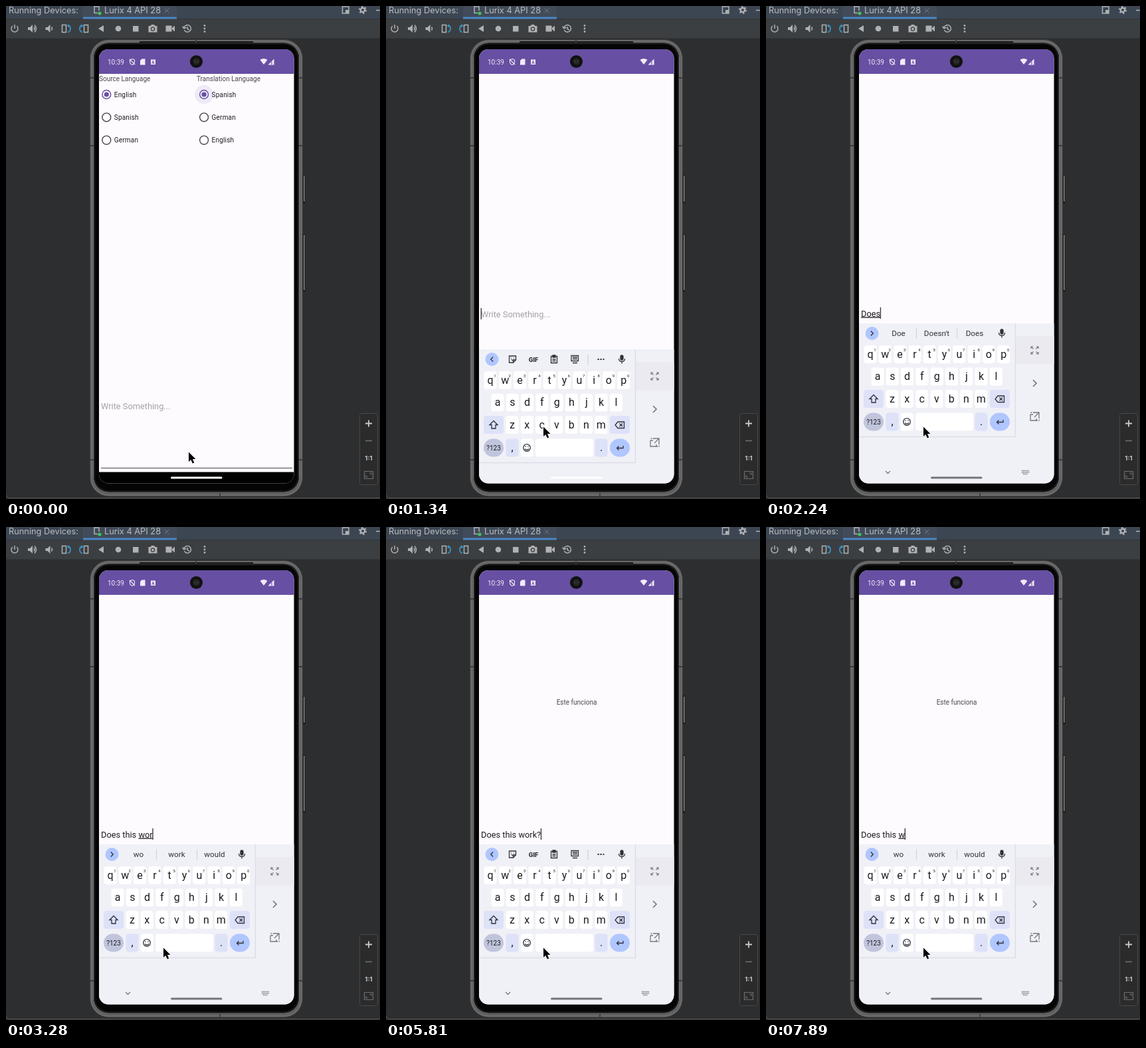
An HTML page that plays this animation: 563x741 px, repeating every 8 s.

```html
<!DOCTYPE html>
<html lang="en">
<head>
<meta charset="utf-8">
<title>Phone translator</title>
<style>
  html, body { margin: 0; width: 100%; height: 100%; overflow: hidden; background: #2d2e30; }
  svg { display: block; width: 100%; height: 100%; }
  text { font-family: Roboto, sans-serif; font-size: 10px; fill: #1d1b20; white-space: pre; }
  .ide text { font: 12.8px Inter, sans-serif; fill: #bbbdbf; }
  .mid, .key { text-anchor: middle; }
  .key { font-size: 16px; }
  .line { fill: none; stroke: #afb1b3; stroke-width: 1.5; }
  .solid { fill: #afb1b3; }
  .dark { fill: none; stroke: #30313a; stroke-width: 1.3; }
  .label, #result { fill: #49454f; }
  #radios text { letter-spacing: .18px; }
  .input, .input text { font-size: 12.8px; }
  #hint { fill: #a4a1a7; }
  .word { font-size: 11.7px; text-anchor: middle; fill: #30313a; }
  #composing { text-decoration: underline; text-decoration-thickness: 1px; }
  #pointer { stroke: #fff; stroke-width: 2; stroke-linejoin: round; paint-order: stroke; }
</style>
</head>
<body>
<svg viewBox="0 0 563 741">
  <defs>
    <clipPath id="screen"><rect x="140" y="65" width="293.5" height="652.5" rx="14"/></clipPath>
  </defs>
  <rect width="563" height="741" fill="#2d2e30"/>

  <g class="ide">
    <rect width="563" height="20" fill="#3c4653"/>
    <rect x="116" width="141" height="19" fill="#414b59"/>
    <rect y="20" width="563" height="28.5" fill="#3c3f41"/>
    <path d="M0 19.5H563" stroke="#323435"/>
    <rect x="116" y="16.5" width="141" height="3" fill="#4a88c7"/>
    <text x="4" y="11">Running Devices:</text>
    <text x="148" y="11">Lurix 4 API 28</text>
    <path class="line" d="M133 0V10.5H138M133 1H140V7"/>
    <circle cx="141" cy="11" r="2.6" fill="#3fc45a"/>
    <path d="M238.5 3.5l7 7m0-7l-7 7" stroke="#6f7780"/>
    <path class="line" d="M506.500 1H516V11H506.500Z"/><path class="solid" d="M511 6h5v5h-5z"/>
    <circle class="line" cx="537" cy="6" r="3.2" style="stroke-width:2.4"/>
    <circle class="line" cx="537" cy="6" r="5" stroke-dasharray="2.2 3.036" style="stroke-width:2.2"/>
    <path class="line" d="M557 6.500h6"/>

    <path class="line" d="M9.700 30.200a5 5 0 1 0 6.600 0M13 28v6"/>
    <g id="speaker">
      <path class="solid" d="M33 32h3l4-4v12l-4-4h-3z"/>
      <path class="line" d="M42 31.500q2 2.500 0 5"/>
    </g>
    <use href="#speaker" x="26.500"/>
    <path class="line" d="M43 28.500q5 5.500 0 11"/>
    <g id="rotate">
      <path class="line" d="M84.500 28.500h6v11h-6z"/>
      <path d="M93 29.500q4 0 4 4.500t-4 5.500m2-11.500l-2 1.500 2 2" fill="none" stroke="#3592c4" stroke-width="1.800"/>
    </g>
    <use href="#rotate" transform="translate(208)scale(-1 1)"/>
    <path class="solid" d="M139 34l8-5v10zM191 30h8.500v8.500H191zM240.500 29.500h9v9h-9zM250 33l4-3.500v9L250 35z"/>
    <circle class="solid" cx="169" cy="34" r="4.300"/>
    <path class="solid" d="M214.500 30h3l1.500-2h4l1.500 2h3v9.500h-13z"/>
    <circle cx="221" cy="34.500" r="2.600" fill="#afb1b3" stroke="#3c3f41" stroke-width="1.300"/>
    <path class="line" d="M268.400 36.200a5.300 5.300 0 1 0-.5-3.200M265.800 30.500l2 3.300 3.700-1.500M273.200 31v3.500l2.500 1.500"/>
    <g class="solid"><circle cx="299" cy="29.500" r="1.400"/><circle cx="299" cy="34" r="1.400"/><circle cx="299" cy="38.500" r="1.400"/></g>

    <rect x="532.500" y="612.500" width="27" height="107" rx="3" fill="#2b2b2c" stroke="#47494b"/>
    <path d="M541 627.500h10m-5-5v10" stroke="#c8cacc" stroke-width="1.800"/>
    <path d="M541 653.500h10" stroke="#6c6e70" stroke-width="1.600"/>
    <text class="mid" x="546" y="682.500" style="font-size:9.500px;font-weight:700;fill:#c8cacc">1:1</text>
    <path d="M539.500 699.500h13v11h-13zM542 705v3h3m2-6h3v3" fill="none" stroke="#6c6e70" stroke-width="1.200"/>
    <path d="M0 734q0 5.500 6 5.500H563" fill="none" stroke="#56585a"/>
  </g>

  <g>
    <path d="M448.500 253.500v43M448.500 342.500v87" stroke="#1b1b1b" stroke-width="3.500"/>
    <path d="M448.800 255v39M448.800 344v83" stroke="#858585" stroke-width="1.500"/>
    <rect x="126.500" y="50.500" width="320" height="686.500" rx="28" fill="#5c5c5c" stroke="#3a3a3a"/>
    <rect x="128.500" y="52.500" width="316" height="682.500" rx="26" fill="none" stroke="#6e6e6e" stroke-width="2"/>
    <rect x="131.500" y="55" width="310" height="676" rx="23" fill="#050505" stroke="#7c7c7c"/>
    <rect x="133" y="56.500" width="307" height="673" rx="22" fill="none" stroke="#1c1c1c" stroke-width="2"/>
    <path d="M201 54h171" stroke="#161616" stroke-width="2"/>
    <path d="M127 108h5M127 210h5M441 108h5M441 210h5M127 682h5M441 682h5M286 51v4M322 732v4" stroke="#3c3c3c" stroke-width="2"/>
  </g>

  <g clip-path="url(#screen)">
    <rect x="140" y="65" width="294" height="653" fill="#fefbff"/>
    <g id="home">
      <text class="label" x="140" y="113">Source Language</text>
      <text class="label" x="287" y="113">Translation Language</text>
      <circle id="ripple" cx="298" cy="133" r="14" fill="#6750a4"/>
      <g id="radios"></g>
      <path id="rule" d="M143 694.500H431" stroke="#49454f"/>
      <rect x="140" y="700.500" width="294" height="18"/>
    </g>
    <text class="mid" id="result" x="287" y="266.500"></text>
    <g class="input" id="input">
      <text id="hint" x="143" y="605.500">Write Something...</text>
      <text id="typed" x="143" y="605.500"><tspan id="done"></tspan><tspan id="composing"></tspan></text>
      <rect id="caret" y="592" width="1.400" height="17" fill="#3f3b48"/>
    </g>

    <g id="board">
      <rect x="140" y="477" width="294" height="245" fill="#f0f0f7"/>
      <rect x="376" y="496.500" width="58" height="42" fill="#eaeaf0"/>
      <path d="M140 647.500H375.500V477" fill="none" stroke="#dddde5" stroke-width="1.500"/>
      <g class="dark" style="stroke:#777780">
        <path d="M399 515v-3h3m5 0h3v3m0 5v3h-3m-5 0h-3v-3M399.500 512.500l3 3m7-3l-3 3m3 7l-3-3m-7 3l3-3" style="stroke-width:1.100"/>
        <path d="M402 562l5 5-5 5" style="stroke-width:1.700"/>
        <path d="M398 614v9h9v-3M398 614h4M404 611h7v7M411 611l-7 7"/>
        <path d="M404 611h-6m13 7v5h-5" stroke-dasharray="2 1.500"/>
      </g>
      <g id="keys"></g>
      <g class="dark">
        <path d="M162 584.500l6 6h-3v5.500h-6V590.500h-3z"/>
        <path d="M349 586h9.500v9.500H349l-4-4.750zM351.500 588.500l4.500 4.500m0-4.500l-4.500 4.500"/>
        <circle cx="212" cy="625" r="5.300"/><path d="M209 626.500q3 3.500 6 0M210 622.500v1.500m4-1.500v1.500"/>
        <path d="M357 622v3.500h-9.500m3-3l-3 3 3 3"/>
        <rect x="353" y="486" width="4" height="7" rx="2" fill="#30313a"/>
        <path d="M350.500 491q0 4.500 4.500 4.500t4.500-4.500M355 495.500v3"/>
      </g>
      <circle cx="159.500" cy="492" r="10" fill="#b0c6ff"/>
      <path id="more" class="dark" d="M157.800 488.500l3.500 3.500-3.500 3.500"/>
      <g id="tools" class="dark">
        <path d="M185.500 487h10v6l-4 4h-6zM195.500 493h-4v4M188.500 492q2 3 4 0M188.500 489.500v1m4-1v1"/>
        <text x="222" y="495.500" class="mid" style="font-weight:900;font-size:9.500px;stroke:none;fill:#30313a">GIF</text>
        <path d="M248.500 487.500h9v10h-9zM251 487.500v-1.500h4v3h-4zM250.500 492h5m-5 2.500h5"/>
        <path d="M279 486.500h10.500v8H279zM281 489h7m-7 2.500h7M281 497.500h7"/>
        <path d="M304 485v15" style="stroke:#cfcfd8"/>
        <path d="M318.500 492h10" stroke-dasharray="2.200 1.800" style="stroke-width:2.200"/>
      </g>
      <g id="words">
        <path d="M226.500 484.500v15.500M287.500 484.500v15.500" stroke="#cfcfd8"/>
        <text class="word" x="199.500" y="496"></text>
        <text class="word" x="257" y="496"></text>
        <text class="word" x="314" y="496"></text>
      </g>
    </g>
    <g id="nav">
      <path class="dark" d="M180 699l3.500 3.500 3.500-3.500" style="stroke:#777780"/>
      <path d="M385 698.500h11m-11 2.500h11m-9 2.500h7" stroke="#777780" stroke-width="1.600" stroke-dasharray="1.600 .8"/>
    </g>
    <path id="handle" d="M249.500 709h74.500" stroke-width="3" stroke-linecap="round"/>

    <g>
      <rect x="140" y="65" width="294" height="37" fill="#674fa3"/>
      <text x="153" y="87.500" style="fill:#f1edf8">10:39</text>
      <path d="M190 79.500l3.500 1.500v3q0 3-3.500 4.500-3.500-1.500-3.500-4.500v-3zM186 80l8 8" fill="none" stroke="#f1edf8" stroke-width="1.100"/>
      <path d="M204.500 79.500h5v9h-7.500v-6.500zM218 80.500h7v7.500h-7z" fill="#f1edf8"/>
      <text x="221.500" y="86.700" class="mid" style="font-size:6.500px;font-weight:700;fill:#674fa3">A</text>
      <path d="M382.500 81q5.500-4 11 0l-5.500 7zM394.500 88.500h9v-9z" fill="#f1edf8"/>
      <path d="M400 88v-4.500" stroke="#674fa3" stroke-width="1.200"/>
      <circle cx="286.500" cy="83.500" r="9.500" fill="#111"/>
      <circle cx="286.500" cy="83.500" r="5" fill="#252525"/>
      <path d="M283.500 83.500h1.500m3 0h1.500" stroke="#484848" stroke-width="1.500"/>
    </g>
  </g>

  <path id="pointer" d="M0 0V14.500L3.300 11.400 5.800 17 8.300 15.900 5.900 10.500H10.500Z"/>
</svg>

<script>
const $ = id => document.getElementById(id);
const show = (el, on) => el.setAttribute('visibility', on ? 'inherit' : 'hidden');

// Radio columns
[['English', 'Spanish', 'German'], ['Spanish', 'German', 'English']].forEach((names, col) =>
  names.forEach((name, row) => {
    const x = 151.3 + 146.8 * col, y = 133 + 34.3 * row, color = row ? '#49454f' : '#6750a4';
    $('radios').innerHTML += `<circle cx="${x}" cy="${y}" r="6.450" fill="none" stroke="${color}" stroke-width="1.430"/>
      ${row ? '' : `<circle cx="${x}" cy="${y}" r="3.600" fill="${color}"/>`}
      <text x="${x + 11.5}" y="${y + 3.8}">${name}</text>`;
  }));

// Keyboard keys
function key(x, y, label = '', w = 19, fill = '#fff', rx = 4, style = '') {
  $('keys').innerHTML += `<rect x="${x - w / 2}" y="${y - 13.5}" width="${w}" height="27" rx="${rx}" fill="${fill}"/>
    <text class="key" x="${x}" y="${y + 5}" style="${style}">${label}</text>`;
}
[['qwertyuiop', 157, 523.5], ['asdfghjkl', 168, 557], ['zxcvbnm', 190, 590.5]].forEach(([row, x0, y], r) =>
  [...row].forEach((letter, i) => {
    const x = x0 + 22.3 * i;
    key(x, y, letter);
    if (!r) $('keys').innerHTML += `<text class="mid" x="${x + 7}" y="${y - 5}" style="font-size:6px">${(i + 1) % 10}</text>`;
  }));
const soft = '#dde2f9';
key(162, 590.5, '', 30, soft);
key(352, 590.5, '', 30, soft);
key(162, 625, '?123', 30, '#c0c5dc', 13.5, 'font-size:10px;transform:translateY(-1.500px)');
key(190, 625, ',', 19, soft);
key(212.3, 625);
key(268.5, 625, '', 87);
key(324, 625, '.', 19, soft);
key(352, 625, '', 30, '#b0c6ff', 13.5);

// [start ms, committed text, word being composed, suggestions]
const ask = 'Does this ';
const typing = [
  [0, '', '', ''],
  [1790, '', 'D', 'D|Do|Did'],
  [1940, '', 'Do', "Do|Don't|Does"],
  [2090, '', 'Doe', "Doe|Doesn't|Does"],
  [2240, '', 'Does', "Doe|Doesn't|Does"],
  [2390, 'Does ', '', 'it|this|that'],
  [2540, 'Does ', 't', 't|the|this'],
  [2690, 'Does ', 'thi', 'thi|this|think'],
  [2840, 'Does ', 'this', 'this|the|things'],
  [2980, ask, '', 'is|work|one'],
  [3130, ask, 'wo', 'wo|work|would'],
  [3280, ask, 'wor', 'wo|work|would'],
  [3430, ask, 'work', 'wo|work|would'],
  [3580, ask, 'work', 'work|works|working'],
  [4020, ask, 'works', 'work|works|working'],
  [5370, ask, 'work', 'work|works|working'],
  [5660, ask + 'work?', '', ''],
  [7310, ask + 'work', '', ''],
  [7450, ask, 'work', 'work|works|working'],
  [7600, ask, 'wor', 'wo|work|would'],
  [7750, ask, 'wo', 'wo|work|would'],
  [7890, ask, 'w', 'wo|work|would']
];
const blinks = [[1640, 1790], [4470, 4920], [6260, 6710]];
const rise = [125, 39, 6, 0];
const words = document.querySelectorAll('.word');

function draw(t) {
  const tick = Math.floor((t + 10) / 150);   // the screen refreshes every 150 ms
  const open = t >= 1190, focus = t >= 1040;

  const p = Math.min(1, tick / 6), left = 1 - p * p * (3 - 2 * p);
  $('pointer').setAttribute('transform', `translate(${237 + 38 * left} ${632.5 + 38 * left})`);
  $('ripple').setAttribute('opacity', tick < 6 ? .1 : focus ? 0 : .05);
  $('rule').setAttribute('stroke-width', focus ? 1.6 : 1);

  show($('home'), !open);
  show($('board'), open);
  const drop = rise[Math.min(3, Math.max(0, tick - 8))];
  $('board').setAttribute('transform', `translate(0 ${drop})`);
  show($('nav'), t >= 1490);
  $('handle').setAttribute('stroke', t < 1490 ? '#fff' : '#74747c');

  const [, done, composing, hints] = typing.findLast(s => s[0] <= t);
  $('done').textContent = done;
  $('composing').textContent = composing;
  show($('hint'), !(done + composing));
  $('input').setAttribute('transform', `translate(0 ${!open ? 0 : t < 1490 ? -138 : -139})`);
  const width = done + composing ? $('typed').getComputedTextLength() : 0;
  $('caret').setAttribute('x', 142.6 + width);
  show($('caret'), focus && !blinks.some(([a, b]) => t >= a && t < b));

  show($('tools'), open && !hints);
  show($('words'), open && hints);
  $('more').setAttribute('transform', hints ? '' : 'translate(319 0)scale(-1 1)');
  hints.split('|').forEach((word, i) => words[i].textContent = word);

  $('result').textContent = t < 3730 ? '' : t < 5810 ? 'Esto funciona' : 'Este funciona';
}

function loop(now) {
  draw(now % 8000);
  requestAnimationFrame(loop);
}
draw(0);
requestAnimationFrame(loop);
</script>
</body>
</html>
```
